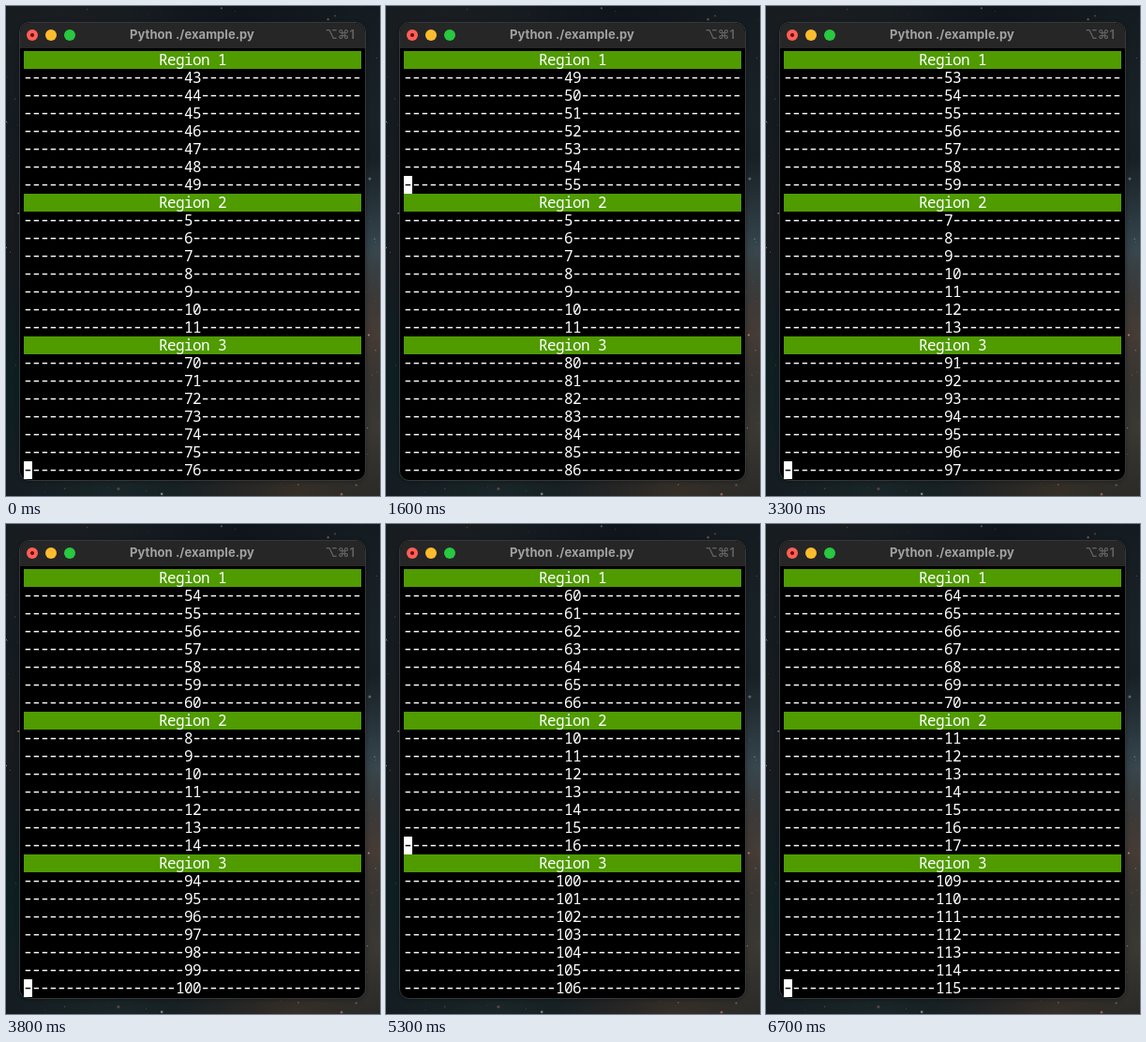
An HTML page with a canvas that plays this animation: 399 px wide and 522 px high, repeating every 6.8 s.

```html
<!DOCTYPE html>
<html lang="en">
<head>
<meta charset="utf-8">
<title>Scrolling regions</title>
<style>
  html, body { margin: 0; width: 100%; height: 100%; overflow: hidden; background: #141b20; }
  #stage { position: relative; width: 399px; height: 522px; overflow: hidden; }
  #sky { position: absolute; inset: 0; }
  #window {
    position: absolute; left: 15px; top: 18px; width: 368px; height: 487px;
    border-radius: 10px; background: #000; overflow: hidden;
  }
  #frame {
    position: absolute; left: 14px; top: 17px; width: 368px; height: 487px;
    border: 1px solid #35383a; border-radius: 11px; box-shadow: 0 1px 4px rgba(0, 0, 0, .3);
  }
  #bar { height: 27px; background: #262626; }
  #bar i { position: absolute; top: 7px; width: 12px; height: 12px; border-radius: 50%; }
  #bar i:nth-child(1) { left: 7px; background: radial-gradient(circle, #70100c 1.6px, #ff5f57 2.4px); }
  #bar i:nth-child(2) { left: 27px; background: #febc2e; }
  #bar i:nth-child(3) { left: 47px; background: #28c840; }
  #title, #key { position: absolute; top: 3px; white-space: pre; }
  #title { left: 0; width: 367px; text-align: center; font: 700 13px/18px Inter, sans-serif; letter-spacing: .06px; color: #a2a2a2; }
  #key { right: 11px; font: 600 13px/18px Inter, "DejaVu Sans", sans-serif; color: #626262; }
  #term { position: absolute; left: 19px; top: 48px; width: 360px; }
  #term div {
    height: 19px; white-space: pre; color: #fff; letter-spacing: -.6px;
    font: 16px/19px "Noto Sans Mono", "DejaVu Sans Mono", monospace;
  }
  /* Larger hyphens, tightened to the same 9px cell. */
  #term .rule { position: relative; left: -.9px; font-size: 18px; font-weight: 500; line-height: 0; letter-spacing: -1.8px; }
  #term .head { background: #4f9b00; }
  #term #cursor { position: absolute; left: 0; top: 0; width: 9px; background: #fff; color: #000; }
</style>
</head>
<body>
<div id="stage">
  <canvas id="sky" width="399" height="522"></canvas>
  <div id="frame"></div>
  <div id="window">
    <div id="bar"><i></i><i></i><i></i><span id="title">Python ./example.py</span><span id="key">⌥⌘1</span></div>
  </div>
  <div id="term"></div>
</div>
<script>
const COLS = 40, LINES = 7, STEP = 100;
const FIRST = [43, 5, 70];
// Region that scrolls at each step; 0 is a pause.
const ORDER = "3" + "3313313313133131" + "331323131" + "33132333" +
  "3231332133" + "1310311312" + "33133132313313";

const term = document.getElementById("term");

function addRow(html, className = "") {
  const row = document.createElement("div");
  row.className = className;
  row.innerHTML = html;
  return term.appendChild(row);
}

function center(text, fill) {
  const left = Math.floor((COLS - text.length) / 2);
  return fill(left) + text + fill(COLS - left - text.length);
}

const spaces = n => " ".repeat(n);
const rule = n => `<span class="rule">${"-".repeat(n)}</span>`;

const regions = FIRST.map((_, i) => {
  addRow(center("Region " + (i + 1), spaces), "head");
  return Array.from({ length: LINES }, () => addRow(""));
});
const cursor = addRow(rule(1));
cursor.id = "cursor";

function render(step) {
  const tops = [...FIRST];
  let active = 2;
  for (let s = 1; s <= step; s++) {
    const region = ORDER[s] - 1;
    if (region < 0) continue;
    tops[region]++;
    active = region;
  }
  regions.forEach((rows, i) => rows.forEach((row, n) => {
    row.innerHTML = center(String(tops[i] + n), rule);
  }));
  cursor.style.top = ((active + 1) * (LINES + 1) - 1) * 19 + "px";
}

function paintSky() {
  const ctx = document.getElementById("sky").getContext("2d");
  ctx.fillStyle = "#141b20";
  ctx.fillRect(0, 0, 399, 522);
  const glow = (x, y, r, rgb, alpha) => {
    const g = ctx.createRadialGradient(x, y, 0, x, y, r);
    g.addColorStop(0, `rgba(${rgb},${alpha})`);
    g.addColorStop(1, `rgba(${rgb},0)`);
    ctx.fillStyle = g;
    ctx.fillRect(0, 0, 399, 522);
  };
  glow(60, 0, 140, "28,30,34", .7);
  glow(250, 0, 120, "14,19,25", .8);
  glow(399, 120, 130, "26,36,40", .8);
  glow(396, 260, 100, "58,76,84", .9);
  glow(399, 350, 100, "84,68,58", .8);
  glow(399, 450, 110, "70,66,58", .8);
  glow(0, 230, 110, "26,26,29", .6);
  glow(0, 400, 120, "12,32,34", .8);
  glow(120, 522, 140, "26,40,42", .8);
  glow(310, 522, 130, "62,52,42", .8);

  let seed = 17;
  const random = () => (seed = seed * 16807 % 2147483647) / 2147483647;
  const tints = ["#c98a7c", "#9a675e", "#b9b4b0", "#667075"];
  for (let i = 0; i < 420; i++) {
    const x = random() * 399, y = random() * 522;
    ctx.globalAlpha = .3 + random() * .6;
    ctx.fillStyle = tints[i % 4];
    ctx.beginPath();
    ctx.arc(x, y, .4 + random() ** 4 * 1.2, 0, 7);
    ctx.fill();
  }
}

paintSky();
const start = performance.now();
let shown = -1;
function tick() {
  const step = Math.floor((performance.now() - start) / STEP) % ORDER.length;
  if (step !== shown) render(shown = step);
  requestAnimationFrame(tick);
}
tick();
</script>
</body>
</html>
```
